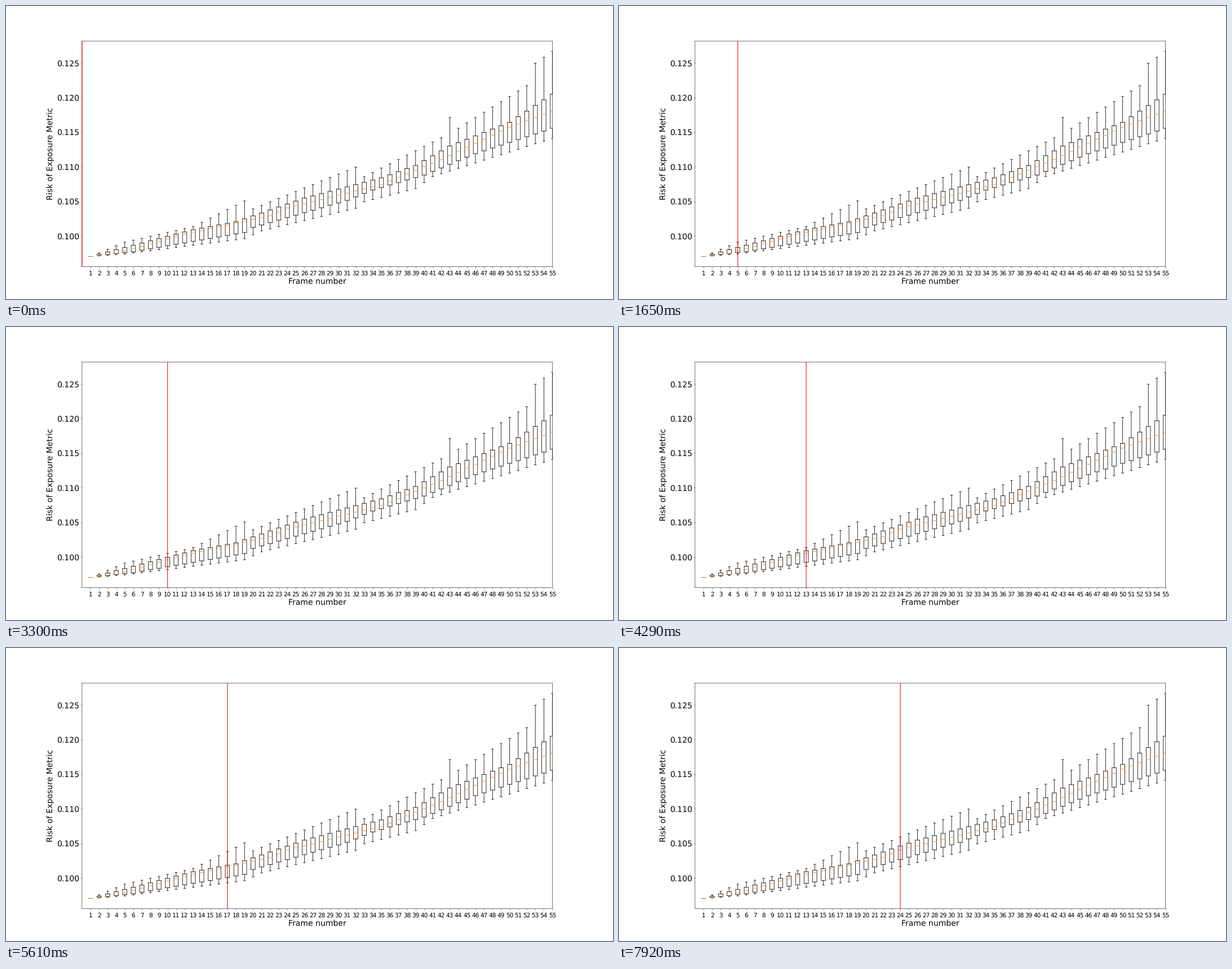
Write a matplotlib script that moves like this. It is 1077 by 520 pixels and loops after 8000 ms.

```python
import matplotlib.pyplot as plt
import numpy as np
from matplotlib.animation import FuncAnimation

WIDTH, HEIGHT, DPI = 1077, 520, 64
SCALE = 0.79            # chart units to points
LOOP_MS, TICK_MS, STEP_MS = 8000, 40, 330
BOXES = 55
LEFT, RIGHT, TOP, FLOOR = 134.87, 969.55, 62.15, 462.55   # plot area in pixels

plt.rcParams.update({
    "font.family": "DejaVu Sans",
    "text.hinting": "none",
    "axes.linewidth": 0.8 * SCALE,
    "axes.labelsize": 20 * SCALE,
})


def to_metric(y):
    """Convert a height on the stage to a value on the risk axis."""
    return 0.1 + (408 - np.asarray(y)) / 12280


x = np.arange(1, BOXES + 1)


def trace(*knots):
    """Values for every box along straight runs between (box, height) knots."""
    return to_metric(np.interp(x, *zip(*knots)))


# The upper whisker climbs steadily and drops back a few times.
top = trace((1, 444.5), (5, 419), (13, 391.5), (19, 346), (20, 360),
            (32, 286), (33, 303), (42, 234), (43, 198), (44, 217),
            (52, 141.5), (53, 101.5), (55, 80.5))
upper = trace((1, 444.5), (13, 397), (18, 383), (26, 341), (35, 305),
              (39, 283), (43, 248.5), (50, 206.5), (55, 156.5))
middle = trace((1, 444.5), (4, 439), (12, 405), (22, 372), (24, 358.5),
               (35, 317), (42, 272.5), (50, 215), (55, 186.5))
lower = trace((1, 444.5), (6, 436), (19, 402), (20, 393), (31, 345),
              (34, 326.5), (40, 300), (46, 262), (55, 217))
bottom = trace((1, 444.5), (5, 440), (19, 413), (21, 399), (32, 359),
               (33, 347.5), (39, 324), (41, 302.5), (55, 235))

fig = plt.figure(figsize=(WIDTH / DPI, HEIGHT / DPI), dpi=DPI, facecolor="white")
ax = fig.add_axes([LEFT / WIDTH, 1 - FLOOR / HEIGHT,
                   (RIGHT - LEFT) / WIDTH, (FLOOR - TOP) / HEIGHT])
stroke = dict(colors="black", linewidths=1.15 * SCALE,
              capstyle="projecting", snap=False)

# Whiskers and their caps
for end, start in ((top, upper), (bottom, lower)):
    ax.vlines(x, start, end, **stroke)
    ax.hlines(end, x - 0.125, x + 0.125, **stroke)

# Boxes
for side in (-0.25, 0.25):
    ax.vlines(x + side, lower, upper, **stroke)
for edge in (lower, upper):
    ax.hlines(edge, x - 0.25, x + 0.25, **stroke)

# Medians
ax.hlines(middle, x - 0.25, x + 0.25, **{**stroke, "colors": "#ff7f0e"})

ax.set_xlim(0, BOXES)
ax.set_ylim(to_metric(FLOOR), to_metric(TOP))
ax.set_xticks(x, [str(n) for n in x])
levels = np.linspace(0.1, 0.125, 6)
ax.set_yticks(levels, [f"{v:.3f}" for v in levels])
tick = dict(length=3.5 * SCALE, width=0.8 * SCALE)
ax.tick_params(axis="x", labelsize=15 * SCALE, pad=5.9 * SCALE, **tick)
ax.tick_params(axis="y", labelsize=20 * SCALE, pad=3.5 * SCALE, **tick)
ax.set_xlabel("Frame number", labelpad=4 * SCALE)
ax.set_ylabel("Risk of Exposure Metric", labelpad=5 * SCALE)
for spine in ax.spines.values():
    spine.set_snap(False)

cursor = ax.axvline(0, color="red", linewidth=1.5 * SCALE, zorder=3,
                    clip_on=False, snap=False, solid_capstyle="butt")


def update(i):
    # A step that falls inside this tick shows from the tick's start.
    step = (i * TICK_MS + TICK_MS - 1) // STEP_MS
    cursor.set_xdata([step, step])
    return (cursor,)


anim = FuncAnimation(fig, update, frames=LOOP_MS // TICK_MS, interval=TICK_MS,
                     repeat=True, repeat_delay=0)
plt.show()
```
